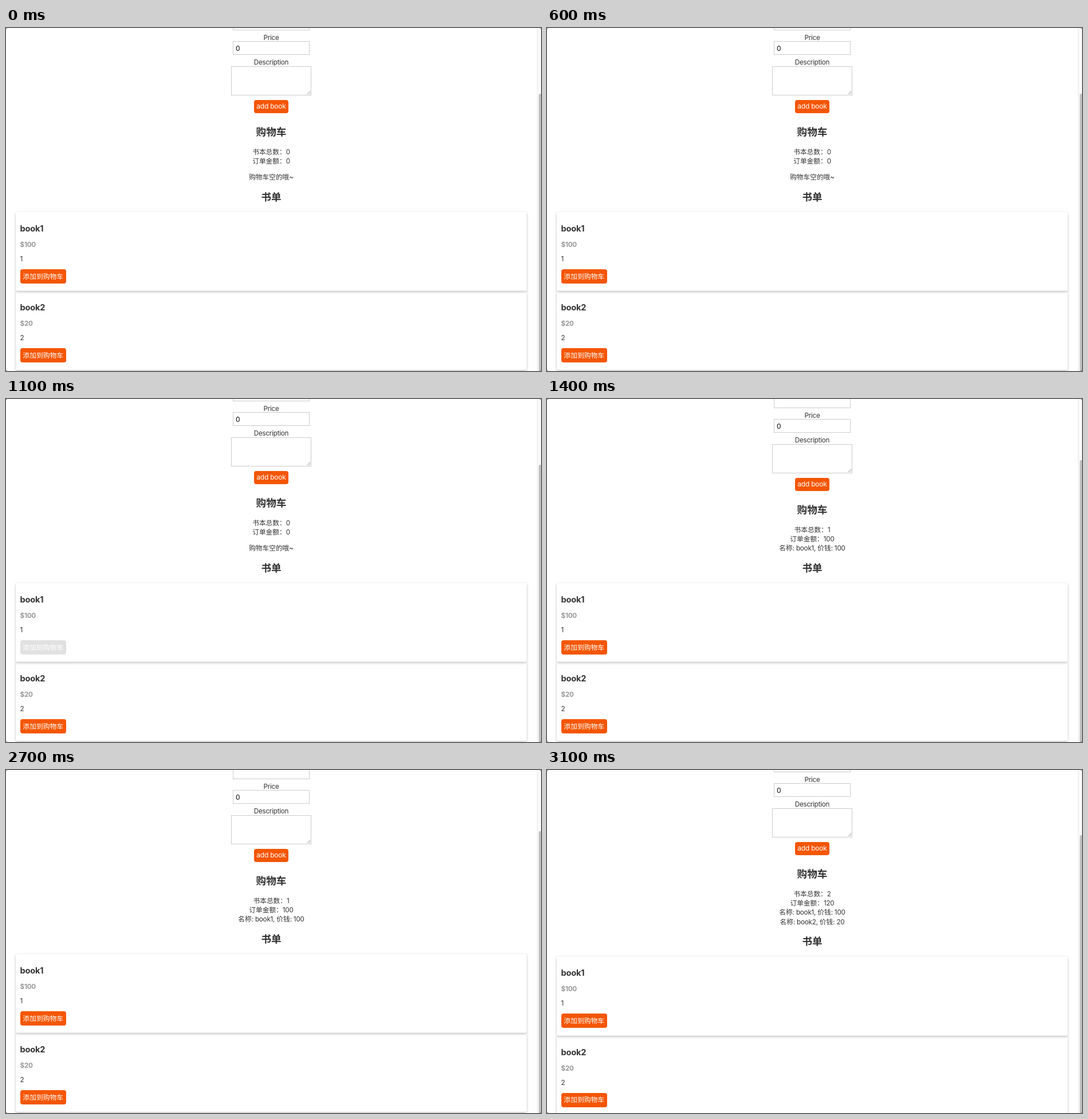
Animation, 934 px wide and 600 px high, one loop 3.5 s. Source, as an HTML page:

```html
<!DOCTYPE html>
<html lang="zh-CN">
<head>
<meta charset="utf-8">
<title>购物车</title>
<style>
html, body { margin: 0; width: 100%; height: 100%; overflow: hidden; background: #fff; }
#stage {
  position: relative; width: 934px; height: 600px; overflow: hidden; background: #fff;
  font: 11.7px/20px Inter, "Noto Sans CJK SC", "Noto Sans CJK", sans-serif;
  color: #333; letter-spacing: -.02em;
}
#stage * { box-sizing: border-box; }
#stage div { position: absolute; }
#form, #cart, #list { left: 0; top: 0; width: 934px; height: 600px; }
.text { white-space: pre; height: 20px; }
.mid { left: 263px; width: 400px; text-align: center; }
.cjk { letter-spacing: 0; }
.h2 { font-size: 17.6px; font-weight: 600; }
.h3 { font-size: 14.6px; font-weight: 700; }
.price { font-weight: 700; color: #999; }
.field { border: 1px solid #ccc; background: #fff; }
.value { color: #000; font-size: 12px; }
.button {
  background: #f45604; color: #fff; border-radius: 4px;
  display: flex; align-items: center; justify-content: center;
  white-space: pre; font-size: 11.8px;
}
.button.off { background: #e1e1e1; }
.card { left: 17px; width: 892px; height: 138.3px; border-radius: 3px; box-shadow: 0 1.5px 4px rgba(0,0,0,.26); }
#track { left: 927px; top: 0; width: 7px; height: 600px; background: #fafafa; border-left: 1px solid #e9e9e9; }
#thumb { left: 929.5px; width: 6px; height: 620px; border-radius: 3px; background: #c1c1c1; }
.corner { width: 2px; height: 2px; }
svg { position: absolute; left: 525px; top: 109px; }
</style>
</head>
<body>
<div id="stage">
  <div id="form">
    <svg width="7" height="8" stroke="#777" stroke-width=".8"><path d="M.8 6.8 6.3 1.3M3.8 6.8 6.3 4.3"/></svg>
  </div>
  <div id="cart"></div>
  <div id="list"></div>
  <div id="track"></div>
  <div id="thumb"></div>
</div>
<script>
const $ = id => document.getElementById(id);

function box(parent, cls, x, y, w, h) {
  const el = document.createElement('div');
  el.className = cls;
  Object.assign(el.style, { left: x + 'px', top: y + 'px', width: w + 'px', height: h + 'px' });
  parent.prepend(el);
  return el;
}

// Tracking is tightened for Latin letters only.
const markup = s => s.replace(/[^\x00-\x7f]+/g, '<span class="cjk">$&</span>');

// y is the vertical centre of the capitals.
function text(parent, y, s, cls = 'mid', x) {
  const el = document.createElement('div');
  el.className = 'text ' + cls;
  el.style.top = y - 10 + 'px';
  if (x !== undefined) el.style.left = x + 'px';
  el.innerHTML = markup(s);
  parent.append(el);
}

function button(parent, x, y, w, h, label) {
  const el = box(parent, 'button', x, y, w, h);
  el.innerHTML = '<span>' + markup(label) + '</span>';
  return el;
}

const form = $('form'), cart = $('cart'), list = $('list');

box(form, 'field', 396, -21, 134, 24.5);
box(form, 'field', 396, 23, 134, 24);
box(form, 'field', 393, 67, 140, 51);
button(form, 433, 126, 60, 22.5, 'add book').style.fontSize = '12px';
text(form, 16.5, 'Price');
text(form, 35.5, '0', 'value', 401);
text(form, 60, 'Description');
text(form, 181.5, '购物车', 'mid h2');

text(list, 296, '书单', 'mid h2');
const buttons = [['book1', '$100', '1'], ['book2', '$20', '2']].map(([name, price, note], i) => {
  const y = 322 + i * 138.2;
  box(list, 'card', 17, y, 892, 138.3);
  text(list, y + 29, name, 'h3', 24.5);
  text(list, y + 57, price, 'price', 24.5);
  text(list, y + 82, note, '', 24.5);
  const add = button(list, 24.5, y + 100, 80.5, 25, '添加到购物车');
  list.append(add);
  return add;
});

for (const [x, y, side] of [[0, 0, '135deg'], [932, 0, '225deg'], [0, 598, '45deg'], [932, 598, '315deg']]) {
  const el = box($('stage'), 'corner', x, y, 2, 2);
  el.style.background = `linear-gradient(${side}, #777 40%, transparent 60%)`;
  $('stage').append(el);
}

const views = [
  { form: 0, list: 0, thumb: 114.5, lines: [[217, '书本总数：0'], [233, '订单金额：0'], [261, '购物车空的哦~']] },
  { form: 12, list: 0, thumb: 107, lines: [[229, '书本总数：1'], [245, '订单金额：100'], [261, '名称: book1, 价钱: 100']] },
  { form: 0, list: 4.4, thumb: 113.5, lines: [[217, '书本总数：2'], [233, '订单金额：120'],
    [249.3, '名称: book1, 价钱: 100'], [265.7, '名称: book2, 价钱: 20']] },
];

// start time, view, disabled button
const steps = [[0, 0, -1], [1100, 0, 0], [1400, 1, -1], [2800, 1, 1], [3100, 2, -1]];
let shown;

function show(step) {
  if (step === shown) return;
  shown = step;
  const [, index, off] = step, view = views[index];
  form.style.top = view.form + 'px';
  list.style.top = view.list + 'px';
  $('thumb').style.top = view.thumb + 'px';
  cart.textContent = '';
  view.lines.forEach(([y, s]) => text(cart, y, s));
  buttons.forEach((b, i) => b.classList.toggle('off', i === off));
}

function tick() {
  const t = performance.now() % 3500;
  show(steps.findLast(s => s[0] <= t));
  requestAnimationFrame(tick);
}
tick();
</script>
</body>
</html>
```
